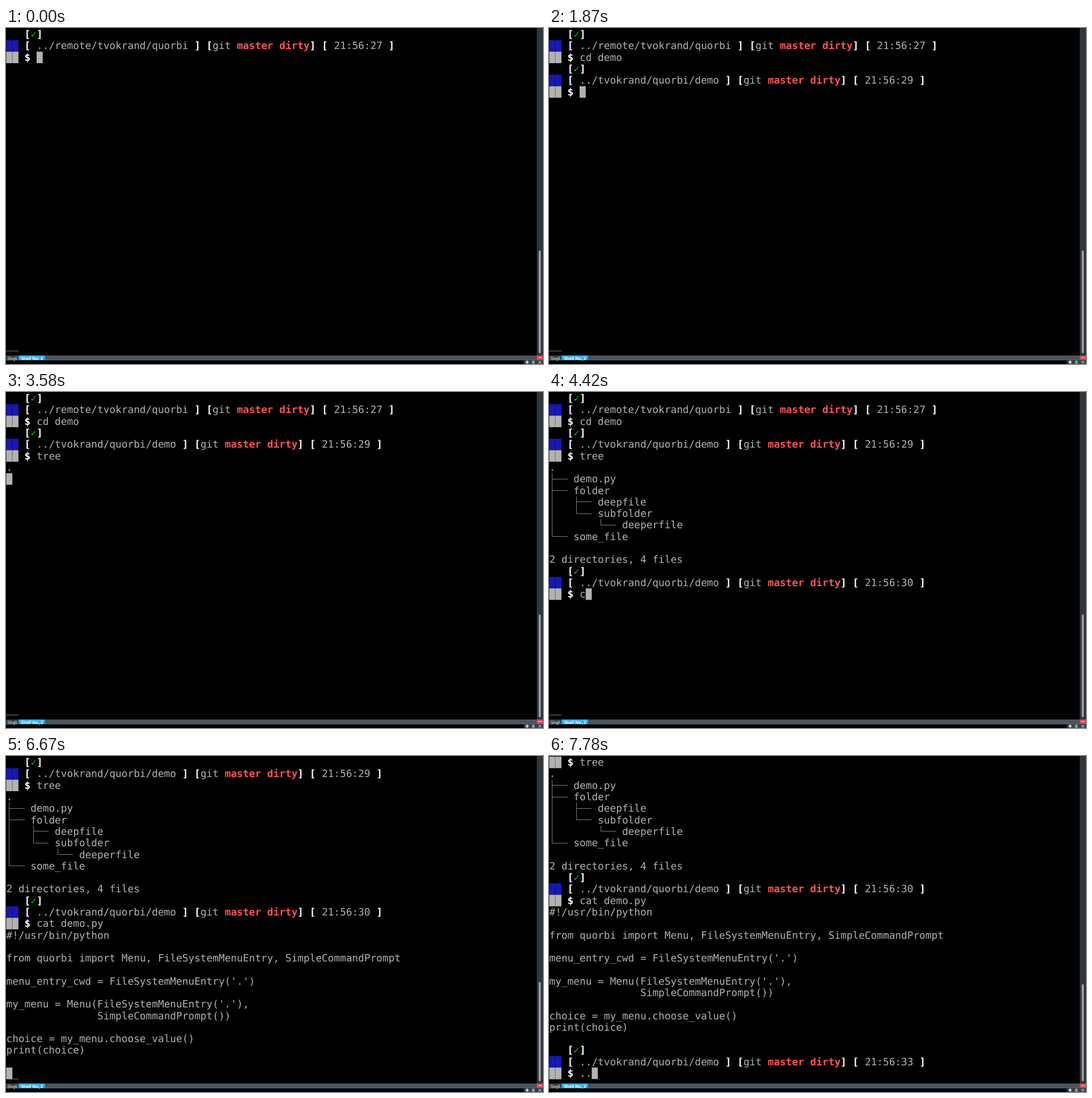
Write an HTML page that moves like this. It is 947 by 592 pixels and loops after 8000 ms.

```html
<!DOCTYPE html>
<html lang="en">
<head>
<meta charset="utf-8">
<title>Terminal session</title>
<style>
  html, body { margin: 0; width: 100%; height: 100%; overflow: hidden; background: #000; }
  svg { display: block; }
  text { white-space: pre; text-rendering: geometricPrecision; }
  #screen text { font: 17.77px "DejaVu Sans Mono", monospace; fill: #b2b2b2; }
  #screen .w { font-weight: bold; fill: #fff; }
  #screen .r { font-weight: bold; fill: #ff5454; }
  #screen .g { fill: #18b218; }
  #screen path { fill: none; stroke: #7c7c7c; shape-rendering: crispEdges; }
  .tab { font: 7.45px "Noto Sans", sans-serif; fill: #eff0f1; }
  .on { font-weight: bold; fill: #fff; }
</style>
</head>
<body>
<svg width="947" height="592" viewBox="0 0 947 592">
  <rect width="947" height="592"/>
  <rect y="568.6" width="22" height="1" fill="#808080"/>
  <g id="screen"></g>

  <rect x="936" width="11" height="577" fill="#31363b"/>
  <rect id="thumb" x="939.5" width="3.6" rx="1.8" fill="#a1a4a7"/>

  <rect y="577" width="936" height="8" fill="#4b545c"/>
  <rect y="577" width="22" height="8" fill="#3b4248"/>
  <rect x="22.5" y="577" width="46" height="8" fill="#3daee9"/>
  <rect y="584.4" width="947" height="1" fill="#3d86b0"/>
  <text class="tab" x="3" y="584.5">Shell</text>
  <text class="tab on" x="26.4" y="584.5">Shell No. 2</text>
  <rect x="14" y="585" width="1" height="2" fill="#c8cacc"/>
  <rect id="speck" x="58.5" y="584" width="1" height="2.4" fill="#e8f4fb"/>

  <rect x="936" y="577" width="11" height="8" fill="#da4453"/>
  <path d="M938.5 580.7h6" stroke="#fff"/>
  <rect x="913.5" y="585.4" width="33.5" height="6.6" fill="#3b4248"/>
  <circle cx="919" cy="588.7" r="1.6" fill="none" stroke="#fff" stroke-width="1.5"/>
  <path d="M927.8 586.8h4.4M927.8 588.7h4.4M927.8 590.6h4.4" stroke="#eff0f1" stroke-width=".9"/>
  <path d="M939.2 586.5l4.4 4.4m0-4.4l-4.4 4.4" stroke="#fff"/>
</svg>
<script>
const CW = 10.7, RH = 20.29, X0 = 0.5, Y0 = 1.1, ROWS = 28, LOOP = 8000;
const FG = '#b2b2b2', BLUE = '#1818b2';
const $ = id => document.getElementById(id);
const colX = c => X0 + c * CW;
const rowY = r => Y0 + r * RH;

const rect = (x, y, w, h, fill) =>
  `<rect x="${x}" y="${y}" width="${w}" height="${h}" fill="${fill}"/>`;

// Each word is placed on the character grid
function put(row, col, str, cls = '') {
  let out = '';
  for (const m of str.matchAll(/\S+/g))
    out += `<text class="${cls}" x="${colX(col + m.index)}" y="${rowY(row) + 16.1}">${m[0]}</text>`;
  return out;
}

const blocks = (row, fill) =>
  rect(X0, rowY(row), CW * 2, RH, fill) + rect(10.6, rowY(row), 1, RH, 'rgba(0,0,0,.4)');

function branches(row, str) {
  let d = '';
  [...str].forEach((ch, i) => {
    const x = colX(i), cx = Math.floor(x + CW / 2) + 0.5;
    const y = rowY(row), cy = Math.floor(y + RH / 2) + 0.5;
    if (ch === '│' || ch === '├') d += `M${cx} ${y}V${y + RH}`;
    if (ch === '└') d += `M${cx} ${y}V${cy}`;
    if (ch === '├' || ch === '└') d += `M${cx} ${cy}H${x + CW}`;
    if (ch === '─') d += `M${x} ${cy}H${x + CW}`;
  });
  return `<path d="${d}"/>` + put(row, 0, str.replace(/[│├└─]/g, ' '));
}

const plain = str => row => put(row, 0, str);
const tree = str => row => branches(row, str);

function prompt(path, time, cmd) {
  const end = 5 + path.length;
  const command = (row, n = cmd.length) =>
    blocks(row, FG) + put(row, 3, '$', 'w') + put(row, 5, cmd.slice(0, n));
  command.typed = true;
  return [
    row => put(row, 3, '[ ]', 'w') + put(row, 4, '✓', 'g'),
    row => blocks(row, BLUE) + put(row, 3, '[', 'w') + put(row, 5, path)
      + put(row, end + 1, '] [', 'w') + put(row, end + 4, 'git')
      + put(row, end + 8, 'master dirty', 'r') + put(row, end + 20, '] [', 'w')
      + put(row, end + 24, time) + put(row, end + 33, ']', 'w'),
    command
  ];
}

const HERE = '../tvokrand/quorbi/demo';
const lines = [
  ...prompt('../remote/tvokrand/quorbi', '21:56:27', 'cd demo'),
  ...prompt(HERE, '21:56:29', 'tree'),
  ...['.',
    '├── demo.py',
    '├── folder',
    '│   ├── deepfile',
    '│   └── subfolder',
    '│       └── deeperfile',
    '└── some_file',
    '',
    '2 directories, 4 files'].map(tree),
  ...prompt(HERE, '21:56:30', 'cat demo.py '),
  ...['#!/usr/bin/python',
    '',
    'from quorbi import Menu, FileSystemMenuEntry, SimpleCommandPrompt',
    '',
    "menu_entry_cwd = FileSystemMenuEntry('.')",
    '',
    "my_menu = Menu(FileSystemMenuEntry('.'),",
    '               SimpleCommandPrompt())',
    '',
    'choice = my_menu.choose_value()',
    'print(choice)',
    ''].map(plain),
  ...prompt(HERE, '21:56:33', '..')
];

// Steps: time, row of the cursor, characters typed there
const keys = (row, ...times) => times.map((t, i) => [t, row, i + 1]);
const steps = [
  [0, 2, 0],
  ...keys(2, 540, 610, 780, 980, 1150, 1240, 1380),
  [1740, 3, 0], [1870, 5, 0],
  ...keys(5, 3060, 3140, 3230, 3310),
  [3480, 6, 0], [3580, 7, 0], [3680, 13, 0], [3790, 15, 0], [3910, 17, 0],
  ...keys(17, 4420, 4750, 4840, 4990, 5530, 5680, 5770),
  [6240, 17, 12], [6570, 18, 0], [6670, 30, 0], [6810, 32, 0],
  ...keys(32, 7660, 7780)
];

function draw([time, row, n]) {
  const scroll = Math.max(0, row - ROWS + 1);
  let out = '';
  for (let i = scroll; i < row; i++) out += lines[i](i - scroll);
  const typed = lines[row].typed;
  if (typed) out += lines[row](row - scroll, n);
  out += rect(colX(typed ? 5 + n : 0), rowY(row - scroll), CW, RH, FG);
  $('screen').innerHTML = out;

  const top = 392 + 2 * scroll;
  $('thumb').setAttribute('y', top);
  $('thumb').setAttribute('height', 573 - top);
  $('speck').setAttribute('opacity', time >= 980 ? 1 : 0);
}

let shown = null;
const start = performance.now();
function tick() {
  const t = Math.max(0, performance.now() - start) % LOOP;
  const step = steps.findLast(s => s[0] <= t);
  if (step !== shown) draw(shown = step);
  requestAnimationFrame(tick);
}
tick();
</script>
</body>
</html>
```
